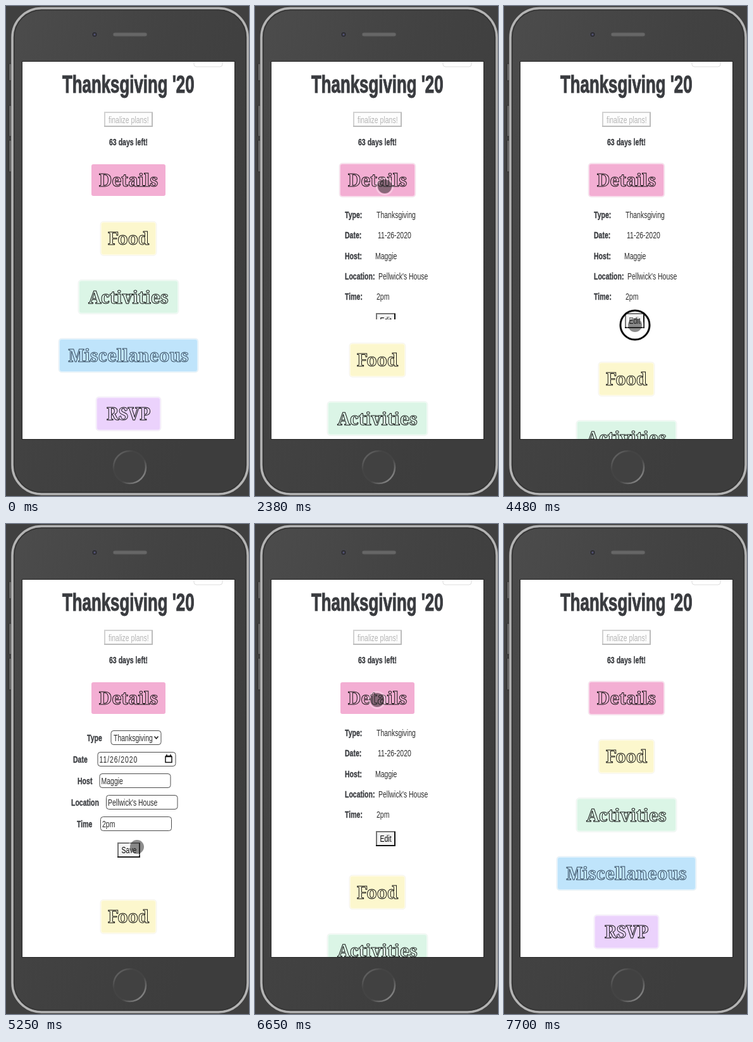
An HTML page for the animation above (7980 ms loop, 384 by 774 pixels).

```html
<!DOCTYPE html>
<html lang="en">
<head>
<meta charset="utf-8">
<title>Holiday planner</title>
<style>
html, body { margin: 0; width: 100%; height: 100%; overflow: hidden; background: #424242; }
svg { display: block; width: 100vw; height: 100vh; }
text { white-space: pre; }
.head { font: bold 15.5px "Liberation Sans", Arial, sans-serif; fill: #3a3c40; stroke: #3a3c40; stroke-width: .35px; }
.title { font-size: 38px; stroke-width: 1.1px; }
.body { font: 14px "Liberation Sans", Arial, sans-serif; fill: #2c2c2c; }
.slab { font: bold 27px "Noto Serif", "DejaVu Serif", serif; letter-spacing: -.3px; text-anchor: middle; stroke-width: .95px; }
.field { fill: #fff; stroke: #4c4c4c; }
</style>
</head>
<body>
<svg viewBox="0 0 384 774">
  <defs>
    <clipPath id="screen"><rect x="26" y="88" width="335" height="596"/></clipPath>
    <clipPath id="fold"><rect id="foldBox" x="26" y="303" width="335" height="0"/></clipPath>
    <linearGradient id="gloss" x2=".9" y2=".7">
      <stop offset="0" stop-color="#4c4c4c"/><stop offset=".5" stop-color="#424242"/><stop offset="1" stop-color="#3d3d3d"/>
    </linearGradient>
    <linearGradient id="home" x2="1" y2="1">
      <stop offset="0" stop-color="#777"/><stop offset=".3" stop-color="#444"/>
      <stop offset=".6" stop-color="#444"/><stop offset="1" stop-color="#a4a4a4"/>
    </linearGradient>
  </defs>
  <rect width="384" height="774" fill="#404040"/>
  <g fill="#666" stroke="#2e2e2e">
    <rect x="4.500" y="91" width="4" height="27" rx="1"/>
    <rect x="4.500" y="157" width="4" height="49" rx="1"/>
    <rect x="4.500" y="212" width="4" height="50" rx="1"/>
  </g>
  <rect x="10" y="3.500" width="372" height="767.500" rx="46" fill="url(#gloss)" stroke="#b4b4b4" stroke-width="3.500"/>
  <rect x="13" y="6.500" width="366" height="761.500" rx="43" fill="none" stroke="#353535" stroke-width="1.500"/>
  <circle cx="140" cy="45" r="4.500" fill="#303034" stroke="#4e4e54"/>
  <circle cx="140" cy="45" r="1.500" fill="#55557a"/>
  <rect x="169" y="42" width="54" height="6" rx="3" fill="#666" stroke="#4f4f4f"/>
  <circle cx="195.500" cy="728.500" r="25.500" fill="#414141" stroke="url(#home)" stroke-width="2.500"/>
  <rect x="25.500" y="87.500" width="336" height="597" fill="#fff" stroke="#222"/>
  <g clip-path="url(#screen)">
    <rect x="297" y="72" width="45" height="24" rx="4" fill="#fff" stroke="#ddd"/>
    <g id="page"></g>
    <g id="view" clip-path="url(#fold)"></g>
    <g id="form"></g>
    <g id="menu"></g>
  </g>
  <circle id="ring" r="23" fill="none" stroke="#0a0a0a" stroke-width="3"/>
  <g id="touch">
    <circle r="13" fill="none" stroke="#fff" stroke-opacity=".35" stroke-width="2"/>
    <circle r="11" fill="#303030" fill-opacity=".55"/>
  </g>
  <path id="arrow" d="M0 0V15.500L3.600 12.200 6.200 18 8.700 17 6.200 11.300H11Z" fill="#000" stroke="#fff"/>
</svg>
<script>
const LOOP = 7980, STEP = 70;
const $ = id => document.getElementById(id);

// Condensed type: one ratio per style
const type = (cls, ratio) => (x, y, s, extra = '') =>
  `<text class="${cls}" transform="translate(${x} ${y}) scale(${ratio} 1)" ${extra}>${s}</text>`;
const head = type('head', .68), title = type('head title', .68), body = type('body', .75);

const bevel = (x, y, w, h, light, dark, fill) =>
  `<rect x="${x}" y="${y}" width="${w}" height="${h}" fill="${fill}"/>
   <path d="M${x + 1} ${y + h}V${y + 1}H${x + w}" fill="none" stroke="${light}" stroke-width="2"/>
   <path d="M${x + w - 1} ${y + 1}V${y + h - 1}H${x}" fill="none" stroke="${dark}" stroke-width="2"/>`;

$('page').innerHTML =
  title(89, 136.5, "Thanksgiving '20") +
  bevel(155, 167, 77, 24, '#d2d2d2', '#bcbcbc', '#fdfdfd') +
  body(162, 185, 'finalize plans!', 'style="fill:#b4b4b4"') +
  head(163, 220, '63 days left!');

const host = 'Maggie', place = "Pellwick's House";
const rows = [
  ['Type:', 192, 'Thanksgiving'], ['Date:', 194, '11-26-2020'], ['Host:', 190, host],
  ['Location:', 195, place], ['Time:', 192, '2pm']
];
$('view').innerHTML = rows.map(([name, x, value], i) => {
  const y = 335 + i * 32.3;
  return head(142, y, name) + body(x, y, value);
}).join('') + bevel(191, 485, 31, 24, '#777', '#111', '#f3f3f3') +
  body(197.5, 502, 'Edit', 'style="fill:#000"');

// label x, label, box x, box width, text x, value
const fields = [
  [128, 'Type', 166, 79, 170, 'Thanksgiving'], [106, 'Date', 145, 123, 147.5, '11/26/2020'],
  [113, 'Host', 148, 112, 150.5, host], [103, 'Location', 158.5, 112.5, 161, place],
  [112, 'Time', 149.500, 112, 152, '2pm']
];
$('form').innerHTML = fields.map(([lx, name, x, w, tx, value], i) => {
  const y = 326.5 + i * 34;
  return head(lx, y + 16.5, name) +
    `<rect class="field" x="${x}" y="${y}" width="${w}" height="22" rx="4"/>` +
    body(tx, y + 16.5, value, name == 'Date' ? 'letter-spacing="1.2"' : '');
}).join('') +
  `<path d="M234.500 335.500L237.500 339 240.500 335.500" fill="none" stroke="#222" stroke-width="1.600"/>
   <path d="M252 367.500H262V376.500H252ZM252 366.500H262M254 364V367M260 364V367" fill="none" stroke="#111" stroke-width="1.500"/>` +
  bevel(176, 503, 36, 24, '#777', '#222', '#f3f3f3') +
  body(182.5, 520, 'Save', 'style="fill:#000"');

const buttons = [
  ['Details', 135, 117, '#f3aed3'], ['Food', 151, 85, '#fcf7cd'], ['Activities', 116, 155, '#dbf5e6'],
  ['Miscellaneous', 85, 217, '#bfe4fb'], ['RSVP', 144, 99, '#ebd2fc']
];
$('menu').innerHTML = buttons.map(([name, x, w, color], i) => {
  const y = 250 + i * 92.3, ink = name == 'Miscellaneous' ? '#34495c' : '#101010';
  return `<g id="${name}">
    <rect class="glow" x="${x - 2}" y="${y - 2}" width="${w + 4}" height="54" rx="5" fill="${color}" fill-opacity=".45" stroke="#eee" stroke-opacity=".6"/>
    <rect x="${x}" y="${y}" width="${w}" height="50" rx="3" fill="${color}"/>
    <text class="slab" x="${x + w / 2}" y="${y + 35}" fill="${color}" stroke="${ink}">${name}</text></g>`;
}).join('');
const glow = name => document.querySelector(`#${name} .glow`);
const lower = buttons.slice(1).map(b => $(b[0]));

const clamp = x => Math.max(0, Math.min(1, x));
const during = (t, a, b) => t >= a && t < b;
const show = (el, on) => el.setAttribute('visibility', on ? 'visible' : 'hidden');

// CSS "ease" curve
function ease(x) {
  let lo = 0, hi = 1, s = .5;
  for (let i = 0; i < 20; i++) {
    s = (lo + hi) / 2;
    if (.75 * s * (1 - s) + s ** 3 < x) lo = s; else hi = s;
  }
  return .3 * s * (1 - s) ** 2 + 3 * s * s * (1 - s) + s ** 3;
}
const slide = (t, start) => ease(clamp((t - start) / 350));

// time, x, y
const path = [
  [70, 371, 790], [850, 232, 645], [1680, 204, 283], [1960, 205, 285], [3300, 205, 285],
  [4270, 207, 504], [4760, 207, 504], [5180, 207, 510], [5250, 207, 510], [5460, 201, 520],
  [5880, 201, 520], [6510, 193, 278], [7100, 193, 278], [7490, 300, 790]
];
function pointer(t) {
  const i = path.findIndex(p => p[0] > t);
  if (i < 1) return [0, -99];
  const [a, x, y] = path[i - 1], [b, u, v] = path[i];
  const k = (t - a) / (b - a), e = k * k * (3 - 2 * k);
  return [x + (u - x) * e, y + (v - y) * e];
}

const clicks = [[2030, 2170], [4410, 4550], [5600, 5740], [6510, 6630]];

function draw(t) {
  const editing = during(t, 4550, 5740);
  const open = 222 * (slide(t, 2180) - slide(t, 6632));
  const shift = editing ? 253 : open;
  lower.forEach(g => g.setAttribute('transform', `translate(0 ${shift})`));
  $('foldBox').setAttribute('height', open);
  show($('view'), open > 0 && !editing);
  show($('form'), editing);

  show(glow('Details'), during(t, 2170, 4550) || t >= 6720);
  glow('RSVP').setAttribute('fill-opacity', during(t, 850, 2730) ? 1 : .45);

  const at = `translate(${pointer(t)})`;
  for (const id of ['ring', 'touch', 'arrow']) $(id).setAttribute('transform', at);
  show($('arrow'), t < 1960);
  show($('touch'), t >= 1960);
  show($('ring'), clicks.some(([a, b]) => during(t, a, b)));
}

function frame() {
  draw(Math.floor(performance.now() % LOOP / STEP) * STEP);
  requestAnimationFrame(frame);
}
frame();
</script>
</body>
</html>
```
